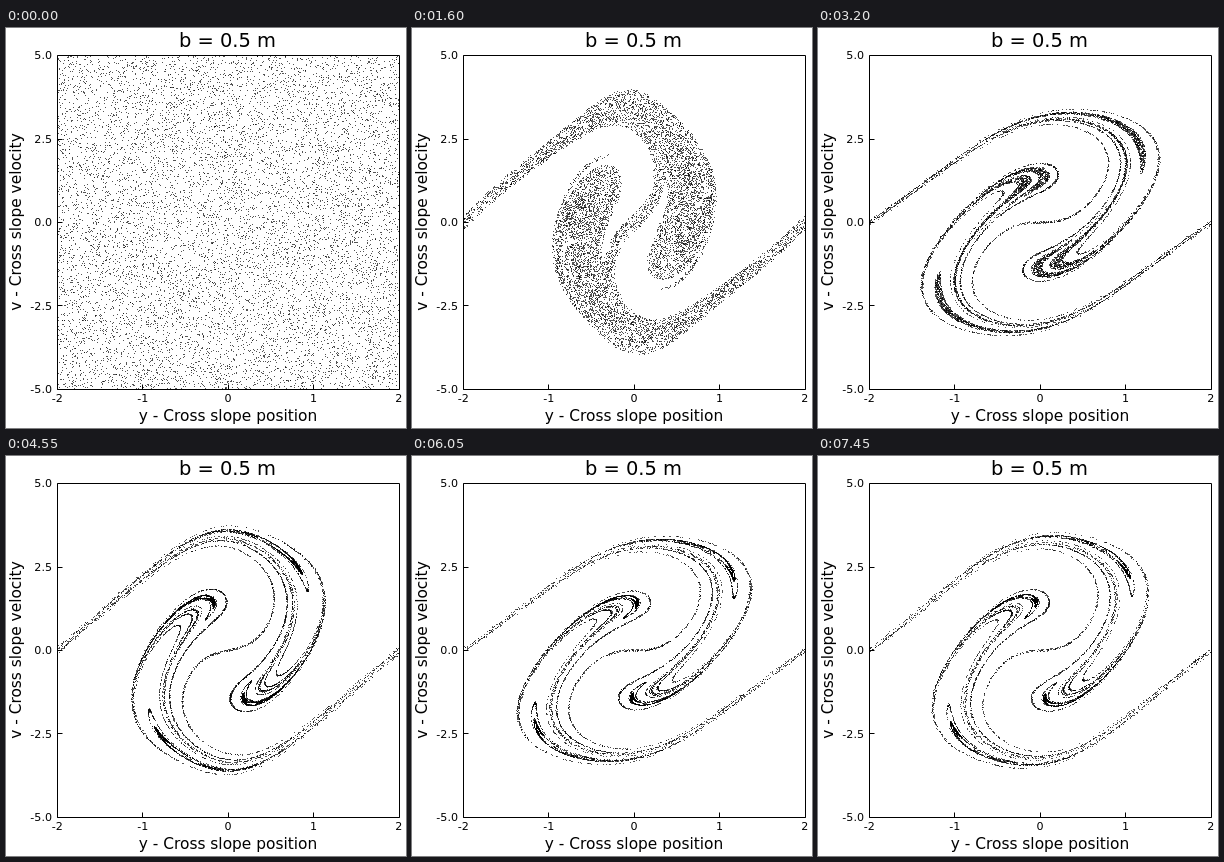
Animation of 400 by 400 pixels, one loop 7.5 s. Source, as an HTML page with a canvas:

```html
<!DOCTYPE html>
<html lang="en">
<head>
<meta charset="utf-8">
<title>Cross slope phase plane</title>
<style>
  html, body { margin: 0; width: 100%; height: 100%; overflow: hidden; background: #fff; }
  canvas { position: absolute; left: 52px; top: 28px; }
  svg { position: absolute; left: 0; top: 0; }
  text { font-family: "DejaVu Sans", sans-serif; font-size: 11.11px; text-anchor: middle; }
  .label { font-size: 15.4px; }
  .title { font-size: 19.44px; }
  .right { text-anchor: end; }
</style>
</head>
<body>
<canvas id="dots" width="341" height="333"></canvas>
<svg id="axes" width="400" height="400">
  <text class="title" x="221.5" y="19">b = 0.5 m</text>
  <text class="label" x="222" y="393">y - Cross slope position</text>
  <text class="label" transform="translate(15 194) rotate(-90)">v - Cross slope velocity</text>
  <path id="lines" fill="none" stroke="#000"/>
</svg>
<script>
const COUNT = 10000, FRAMES = 150, FRAME_MS = 50;
const DT = 0.1, SUBSTEPS = 2;

// Sled on a mogul slope: H = -a x - b cos(p x) cos(q y), constant downhill speed u
const g = 9.81, a = 0.25, b = 0.5, c = 0.5, u = 3.5;
const p = 2 * Math.PI / 10, q = 2 * Math.PI / 4;

const axes = document.getElementById('axes');
const ctx = document.getElementById('dots').getContext('2d');

function addText(str, x, y, cls) {
  const el = document.createElementNS('http://www.w3.org/2000/svg', 'text');
  el.textContent = str;
  el.setAttribute('x', x);
  el.setAttribute('y', y);
  if (cls) el.setAttribute('class', cls);
  axes.append(el);
}

function drawAxes() {
  let path = 'M51.5 27.5H393.5V361.5H51.5Z';
  for (let i = 0; i < 5; i++) {
    const x = Math.floor(51.5 + i * 85.4) + 0.5, y = Math.floor(27.6 + i * 83.4) + 0.5;
    path += `M${x} 361.5v-5M51.5 ${y}h5`;
    addText(i - 2, 51.3 + i * 85.4, 374);
    addText((5 - i * 2.5).toFixed(1), 46, 31.3 + i * 83.4, 'right');
  }
  document.getElementById('lines').setAttribute('d', path);
}

let seed = 20231;
function random() {
  seed = (seed + 0x6D2B79F5) | 0;
  let r = Math.imul(seed ^ seed >>> 15, 1 | seed);
  r = r + Math.imul(r ^ r >>> 7, 61 | r) ^ r;
  return ((r ^ r >>> 14) >>> 0) / 4294967296;
}

const ys = new Float64Array(COUNT), vs = new Float64Array(COUNT);
for (let i = 0; i < COUNT; i++) {
  ys[i] = random() * 4 - 2;
  vs[i] = random() * 10 - 5;
}

// Cross-slope acceleration, with the sled held on the surface at speed u;
// C and S are cos(p x) and sin(p x)
function accel(y, v, C, S) {
  const sn = Math.sin(q * y), cs = Math.cos(q * y);
  const hx = -a + b * p * S * cs, hy = b * q * C * sn;
  const curve = b * (C * cs * (p * p * u * u + q * q * v * v) - 2 * p * q * S * sn * u * v);
  return -hy * (g + c * u * hx + curve) / (1 + hy * hy) - c * v;
}

// One Runge-Kutta step for every point
function step(t, h) {
  const phase = k => [Math.cos(p * u * (t + k * h)), Math.sin(p * u * (t + k * h))];
  const [C0, S0] = phase(0), [C1, S1] = phase(0.5), [C2, S2] = phase(1);
  for (let i = 0; i < COUNT; i++) {
    const y = ys[i], v = vs[i];
    const a1 = accel(y, v, C0, S0);
    const v2 = v + a1 * h / 2, a2 = accel(y + v * h / 2, v2, C1, S1);
    const v3 = v + a2 * h / 2, a3 = accel(y + v2 * h / 2, v3, C1, S1);
    const v4 = v + a3 * h, a4 = accel(y + v3 * h, v4, C2, S2);
    const next = y + (v + 2 * v2 + 2 * v3 + v4) * h / 6;
    ys[i] = next - 4 * Math.floor((next + 2) / 4);
    vs[i] = v + (a1 + 2 * a2 + 2 * a3 + a4) * h / 6;
  }
}

// Pixel positions of each frame, computed once when first needed
const frames = [];
function snapshot() {
  const px = new Int16Array(COUNT * 2);
  for (let i = 0; i < COUNT; i++) {
    px[2 * i] = Math.floor((ys[i] + 2) * 85.4 - 0.3);
    px[2 * i + 1] = Math.floor((5 - vs[i]) * 33.35 - 0.3);
  }
  frames.push(px);
}

function getFrame(n) {
  while (frames.length <= n) {
    const t = (frames.length - 1) * DT, h = DT / SUBSTEPS;
    for (let k = 0; k < SUBSTEPS; k++) step(t + k * h, h);
    snapshot();
  }
  return frames[n];
}

let shown = -1;
function draw() {
  const n = Math.floor(performance.now() / FRAME_MS) % FRAMES;
  if (n !== shown) {
    shown = n;
    const px = getFrame(n);
    ctx.clearRect(0, 0, 341, 333);
    ctx.fillStyle = 'rgba(0,0,0,.67)';
    for (let i = 0; i < px.length; i += 2) ctx.fillRect(px[i], px[i + 1], 1, 1);
  }
  requestAnimationFrame(draw);
}

drawAxes();
snapshot();
draw();
</script>
</body>
</html>
```
